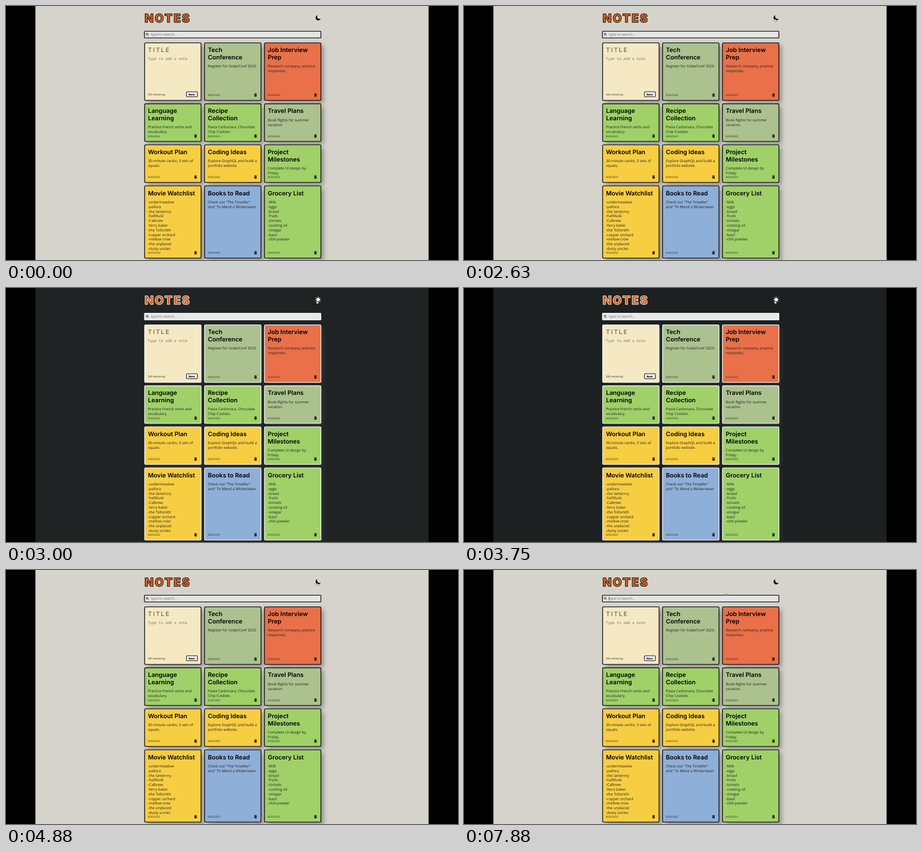
Write an HTML page that moves like this. It is 853 by 480 pixels and loops after 8000 ms.

```html
<!DOCTYPE html>
<html lang="en">
<head>
<meta charset="utf-8">
<title>Notes</title>
<style>
html, body { margin: 0; width: 100%; height: 100%; overflow: hidden; background: #000; }
svg { display: block; width: 853px; height: 480px; }
text { font-family: "Open Sans", "Noto Sans", sans-serif; font-size: 6.9px; fill: #222; text-rendering: geometricPrecision; white-space: pre; }
.head { font: 600 11.5px Inter, sans-serif; fill: #000; }
.small { font-size: 4.85px; }
.logo { font: 900 22.3px Inter, sans-serif; letter-spacing: 1.9px; fill: #d2621f; stroke-width: 1; }
.hint { fill: #757575; font-size: 6.8px; }
.title { letter-spacing: 2.1px; fill: #77745f; }
.mono { font: 6.9px "Noto Sans Mono", "DejaVu Sans Mono", monospace; fill: #77745f; }
.save { font: 900 4.8px Inter, sans-serif; fill: #000; }
.shadow { fill: #404046; opacity: .48; filter: blur(4px); }
.edge { stroke-width: 1.4; }
</style>
</head>
<body>
<svg viewBox="0 0 853 480">
  <rect id="page" x="55.5" width="742" height="480"/>
  <text class="logo" x="261.5" y="30.7">NOTES</text>
  <path id="moon" d="M587.6 17.4A5 5 0 1 0 593.9 23.9A4.8 4.8 0 0 1 587.6 17.4Z"/>
  <g id="sun" fill="#fff" stroke="#fff" stroke-linecap="round">
    <circle cx="589" cy="22" r="3"/>
  </g>
  <rect class="edge" x="261.3" y="47.6" width="333" height="12.8" rx="1" id="search"/>
  <g fill="none" stroke="#111" stroke-width=".9">
    <circle cx="266.2" cy="53.2" r="1.7"/>
    <path d="M267.4 54.4L269.4 56.4"/>
  </g>
  <text class="hint" x="273.2" y="56.4">type to search...</text>
  <path id="caret" d="M273.8 50.8V57.4" stroke="#222" stroke-width=".7"/>
  <g id="shadows"></g>
  <g id="cards"></g>
  <g id="cursor">
    <path id="arrow" d="M0 0V4.4L1.1 3.5L1.8 5L2.6 4.6L1.9 3.2H3.2Z" fill="#111" stroke="#fff" stroke-width=".4"/>
    <path id="beam" d="M-1 -2.7Q0 -2.7 0 -2V2Q0 2.7 -1 2.7M1 -2.7Q0 -2.7 0 -2M0 2Q0 2.7 1 2.7" fill="none" stroke="#222" stroke-width=".65"/>
    <path id="hand" d="M-.6 0Q0 -.7 .6 0V1.8L2.4 2.2Q3 2.4 2.8 3.2L2.3 5.2H-.8L-2.2 3.3Q-2 2.5 -.6 3.2Z" fill="#fff" stroke="#222" stroke-width=".5"/>
  </g>
</svg>
<script>
const $ = id => document.getElementById(id);
const LOOP = 8000, DARK_AT = 2750, LIGHT_AT = 4500, FADE = 300, CLICK_AT = 6800;
const LIGHT = [214, 211, 204], DARK = [28, 32, 33];
const SAGE = '#abc28e', RED = '#e97048', GREEN = '#9fd168', YELLOW = '#f7ce42', BLUE = '#8eafd8';
const cols = [261.6, 374.7, 487.8], WIDTH = 106.5;
const rows = [[69.6, 178.4], [184.8, 255.9], [262.4, 333.4], [339.9, 476.4]];

// column, row, colour, heading, body
const notes = [
  [1, 0, SAGE, 'Tech|Conference', 'Register for CedarConf 2023.'],
  [2, 0, RED, 'Job Interview|Prep', 'Research company, practice|responses.'],
  [0, 1, GREEN, 'Language|Learning', 'Practice French verbs and|vocabulary.'],
  [1, 1, GREEN, 'Recipe|Collection', 'Pasta Carbonara, Chocolate|Chip Cookies.'],
  [2, 1, SAGE, 'Travel Plans', 'Book flights for summer|vacation.'],
  [0, 2, YELLOW, 'Workout Plan', '30-minute cardio, 3 sets of|squats.'],
  [1, 2, YELLOW, 'Coding Ideas', 'Explore GraphQL and build a|portfolio website.'],
  [2, 2, GREEN, 'Project|Milestones', 'Complete UI design by|Friday.'],
  [0, 3, YELLOW, 'Movie Watchlist', '-undermeadow|-pallora|-the lanternry|-halfdusk|-Calbrew|-ferry baker|-the Tollsmith|-copper orchard|-mellow crow|-the unplaced|-dusty uncles'],
  [1, 3, BLUE, 'Books to Read', 'Check out "The Tinseller"|and "To Mend a Wickerswan'],
  [2, 3, GREEN, 'Grocery List', '-Milk|-eggs|-bread|-fruits|-tomato|-cooking oil|-vinegar|-basil|-chili powder']
];

const text = (cls, x, y, str) => `<text class="${cls}" x="${x}" y="${y}">${str}</text>`;
const lines = (cls, x, y, step, list) => list.map((s, i) => text(cls, x, y + i * step, s)).join('');
const box = (col, row, attrs, shift = 0) =>
  `<rect x="${cols[col] + shift}" y="${rows[row][0] + shift}" width="${WIDTH}" height="${rows[row][1] - rows[row][0]}" rx="1.8" ${attrs}/>`;
const bin = (x, y, paper) => `<g transform="translate(${x} ${y})" fill="#111">
  <path d="M-2.5 -2.7H-1.2L-.8 -3.1H.8L1.2 -2.7H2.5V-1.9H-2.5Z"/>
  <rect x="-2.1" y="-1.5" width="4.2" height="4.6" rx=".6"/>
  <path d="M-.8 0L.8 1.6M.8 0L-.8 1.6" stroke="${paper}" stroke-width=".5"/></g>`;

function note([col, row, paper, heading, body]) {
  const x = cols[col] + 6.3, [top, bottom] = rows[row], heads = heading.split('|');
  return box(col, row, `class="edge" fill="${paper}"`) +
    lines('head', x, top + 17.6, 13.6, heads) +
    lines('', x, top + 19.4 + 13.6 * heads.length, 8.81, body.split('|')) +
    text('small', x, bottom - 8.4, '8/20/2023') + bin(cols[col] + 96.2, bottom - 10.2, paper);
}

$('shadows').innerHTML = rows.map((_, r) => cols.map((_, c) => box(c, r, 'class="shadow"', 5)).join('')).join('');
$('cards').innerHTML = box(0, 0, 'class="edge" fill="#f5e9c3"') +
  text('head title', 267.7, 87.2, 'TITLE') +
  text('mono', 267.7, 102, 'Type to add a note') +
  text('small', 267.7, 168.8, '200 remaining') +
  '<rect x="340.5" y="162" width="20.8" height="9.5" rx="1.6" fill="#eee" stroke="#111" stroke-width="1.1"/>' +
  text('save', 344.4, 168.5, 'Save') + notes.map(note).join('');

for (let i = 0; i < 8; i++) {
  $('sun').innerHTML += `<path d="M4.6 0H5.1" stroke-width="1.1" transform="translate(589 22) rotate(${i * 45})"/>`;
}

// time, x, y of the pointer
const path = [
  [950, 340, 66], [1300, 306, 53], [1600, 306, 53], [2200, 540, 40], [2500, 587.2, 24.3],
  [5300, 587.2, 24.3], [6000, 420, 46], [6450, 331, 52.7], [7100, 331, 52.7], [7750, 494.5, 44], [8000, 494.5, 44]
];

// CSS "ease": cubic-bezier(.25, .1, .25, 1)
function ease(p) {
  if (p <= 0 || p >= 1) return p <= 0 ? 0 : 1;
  let lo = 0, hi = 1, s = .5;
  for (let i = 0; i < 20; i++) {
    s = (lo + hi) / 2;
    if (.75 * s * (1 - s) + s ** 3 < p) lo = s; else hi = s;
  }
  return .3 * s * (1 - s) ** 2 + 3 * s * s * (1 - s) + s ** 3;
}

function pointer(t) {
  const i = path.findIndex(k => k[0] > t);
  if (i < 1) return null;
  const [t0, x0, y0] = path[i - 1], [t1, x1, y1] = path[i];
  const p = (t - t0) / (t1 - t0), q = p * p * (3 - 2 * p);
  return [x0 + (x1 - x0) * q, y0 + (y1 - y0) * q];
}

const show = (id, on) => $(id).setAttribute('display', on ? 'inline' : 'none');
const edges = document.querySelectorAll('.edge, .logo');

function draw(t) {
  const dark = t >= DARK_AT && t < LIGHT_AT;
  const mix = ease((t - DARK_AT) / FADE) - ease((t - LIGHT_AT) / FADE);
  $('page').setAttribute('fill', `rgb(${LIGHT.map((v, i) => Math.round(v + (DARK[i] - v) * mix))})`);
  edges.forEach(e => e.setAttribute('stroke', dark ? '#f0f0ee' : '#0c0c0c'));
  $('search').setAttribute('fill', dark ? '#e8e9e7' : '#e2e5e3');
  show('moon', !dark);
  show('sun', dark);
  show('caret', t >= CLICK_AT && (t - CLICK_AT) % 1000 < 500);

  const at = pointer(t);
  show('cursor', at);
  if (!at) return;
  const [x, y] = at;
  const kind = x > 582 && y < 29 ? 'hand' : y > 47 && y < 61 ? 'beam' : 'arrow';
  for (const k of ['arrow', 'beam', 'hand']) show(k, k === kind);
  $('cursor').setAttribute('transform', `translate(${x} ${y})`);
}

const start = performance.now();
function tick() {
  draw((performance.now() - start) % LOOP);
  requestAnimationFrame(tick);
}
tick();
</script>
</body>
</html>
```
